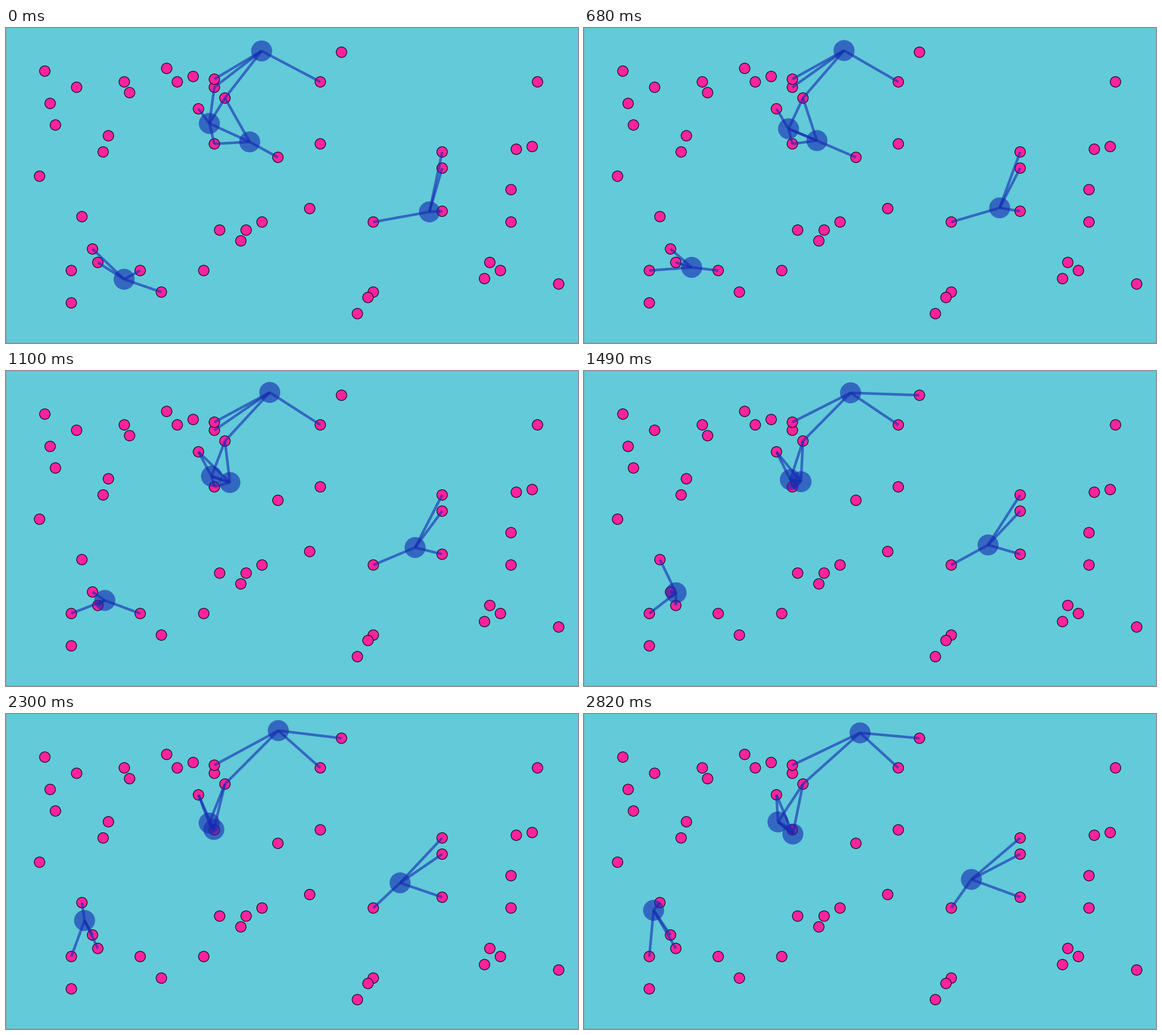
Write a matplotlib script that moves like this. It is 1007 px wide and 556 px high and loops after 2.92 s.

```python
import numpy as np
import matplotlib.pyplot as plt
from matplotlib.animation import FuncAnimation
from matplotlib.collections import EllipseCollection, LineCollection

W, H, DPI = 1007, 556, 64
PT = 72 / DPI  # points per pixel
TICK, LOOP, STEPS = 10, 2920, 21

WATER = "#62cad9"
PINK = "#ff229f"
BLUE = (22 / 255, 44 / 255, 178 / 255, 0.62)
RIM = "#7fa9b0"
LINKS = 4

# Fixed nodes as (column, row) on a regular lattice
CELLS = [
    (7, 15), (13, 21), (8, 27), (9, 35), (22, 19), (23, 23), (19, 39),
    (18, 45), (6, 54), (30, 14), (32, 19), (35, 17), (39, 21), (39, 18),
    (41, 25), (36, 29), (39, 42), (51, 47), (59, 19), (59, 42), (63, 8),
    (100, 19), (96, 44), (99, 43), (95, 59), (95, 71), (82, 45), (82, 51),
    (82, 67), (69, 71), (57, 66), (48, 71), (45, 74), (40, 74), (44, 78),
    (37, 89), (14, 69), (16, 81), (17, 86), (12, 89), (25, 89), (29, 97),
    (12, 101), (66, 105), (69, 97), (68, 99), (90, 92), (91, 86), (93, 89),
    (104, 94),
]
NODES = np.array(CELLS) * (9.326, 4.757) + (3.1, 4.7)

# Rovers travel in straight lines; the first one also drifts up and down
START = np.array([(450, 40.5), (358, 168.5), (429, 201), (745.5, 324.5), (208, 443.5)])
TRAVEL = np.array([(36, 0), (9.7, 43.3), (-87.5, -10.5), (-63.5, -32.5), (-85.5, -97)])


def gap(step):
    """Milliseconds a step stays; the beat stumbles every ninth step."""
    if step == 0:
        return 160
    return 130 + {6: 10, 7: 20}.get(step % 9, 0)


TIMES = np.cumsum([0] + [gap(s) for s in range(STEPS)])


def rover_positions(step):
    share = np.interp(step, [0, 5, 8, STEPS], [0, 0.216, 0.398, 1])
    pos = START + TRAVEL * share
    pos[0, 1] = np.interp(step, [0, 5, 8, 11, 14, 17, STEPS],
                          [40.5, 39.8, 37.8, 38.5, 36, 29.3, 33.3])
    return pos


def nearest_links(rovers):
    points = np.vstack([NODES, rovers])
    links = []
    for rover in rovers:
        dist = np.hypot(*(points - rover).T)
        links += [(rover, points[i]) for i in np.argsort(dist)[1:LINKS + 1]]
    return links


def discs(centers, diameter, **style):
    size = np.full(len(centers), diameter)
    group = EllipseCollection(size, size, np.zeros(len(centers)), units="x",
                              offsets=centers, offset_transform=ax.transData, **style)
    return ax.add_collection(group, autolim=False)


fig = plt.figure(figsize=(W / DPI, H / DPI), dpi=DPI, facecolor=WATER)
ax = fig.add_axes([0, 0, 1, 1])
ax.set(xlim=(0, W), ylim=(H, 0))
ax.axis("off")

ax.add_patch(plt.Rectangle((0, 0), 1, H, fc=RIM, lw=0))
ax.add_patch(plt.Rectangle((0, H - 1), W, 1, fc=RIM, lw=0))
discs(NODES, 18.6, facecolors=PINK, edgecolors="black", linewidths=1.1 * PT, zorder=2)
lines = LineCollection([], colors=[BLUE], linewidths=4.6 * PT, capstyle="butt", zorder=3)
ax.add_collection(lines, autolim=False)
rover_discs = discs(START, 37, facecolors=[BLUE], edgecolors="none", linewidths=0, zorder=4)


def draw(frame):
    step = np.searchsorted(TIMES, frame * TICK, side="right") - 1
    rovers = rover_positions(step)
    lines.set_segments(nearest_links(rovers))
    rover_discs.set_offsets(rovers)
    return lines, rover_discs


anim = FuncAnimation(fig, draw, frames=LOOP // TICK, interval=TICK,
                     repeat=True, repeat_delay=0, blit=False)
plt.show()
```
